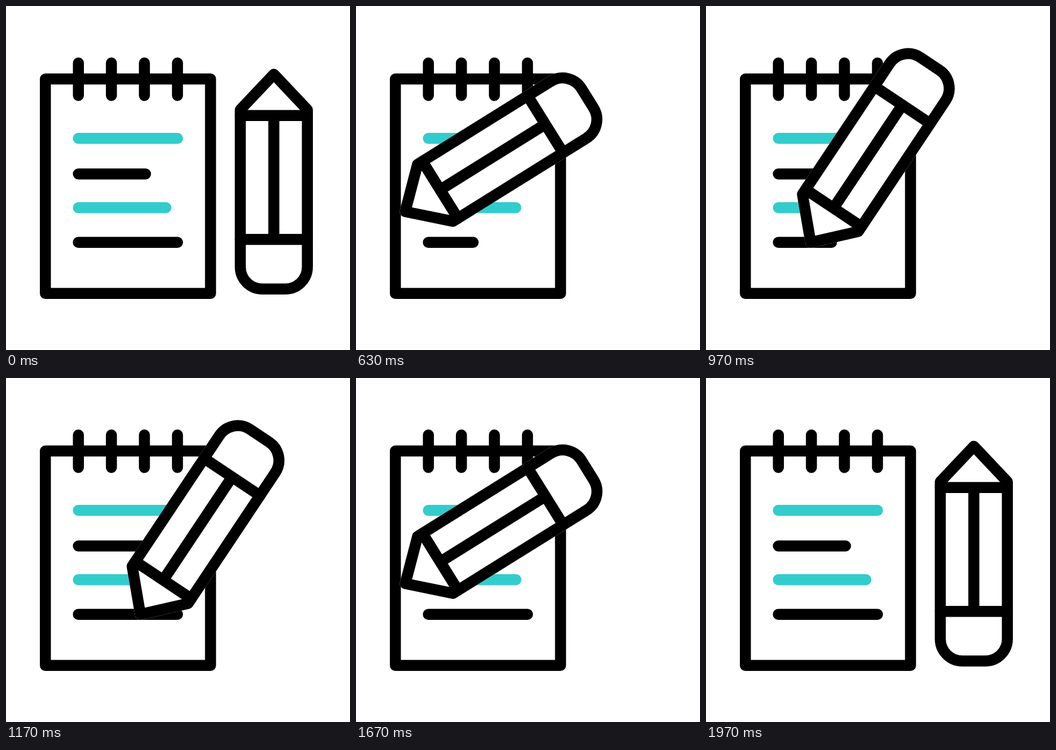
Recreate the animation shown at these times as an HTML page. Size 640x640 px, loop 2500 ms.

```html
<!DOCTYPE html>
<html lang="en">
<head>
<meta charset="utf-8">
<title>Notepad and pencil</title>
<style>
  html, body { margin: 0; width: 100%; height: 100%; overflow: hidden; background: #fff; }
  svg { display: block; width: 100vw; height: 100vh; }
</style>
</head>
<body>
<svg viewBox="0 0 640 640" fill="none" stroke="#000" stroke-width="20.5" stroke-linecap="round" stroke-linejoin="round">
  <defs>
    <path id="body" d="M-62.4-134 0-200 62.4-134V158.5a41 41 0 0 1-41 41H-21.4a41 41 0 0 1-41-41Z"/>
  </defs>
  <path d="M73.25 135.75H380.5V534.75H73.25Z"/>
  <path d="M134.7 106V166.5M196.1 106V166.5M257.5 106V166.5M319 106V166.5M134.6 312.6H259.6"/>
  <path stroke="#3cc" d="M134.6 246.2H319M134.6 375.2H297.5"/>
  <path id="line"/>
  <g id="pencil">
    <use href="#body" fill="#fff" stroke="#fff"/>
    <use href="#body"/>
    <path d="M-62.4-123.3H62.4M-62.4 107.3H62.4M0-123.3V107.3"/>
  </g>
</svg>
<script>
const FPS = 30, LOOP = 2500;
const line = document.getElementById('line');
const pencil = document.getElementById('pencil');

const mix = (a, b, p) => a + (b - a) * p;
const span = (f, from, to) => Math.min(1, Math.max(0, (f - from) / (to - from)));

function bezier(x1, y1, x2, y2) {
  const at = (u, a, b) => 3 * (1 - u) ** 2 * u * a + 3 * (1 - u) * u * u * b + u ** 3;
  return s => {
    let lo = 0, hi = 1;
    for (let i = 0; i < 24; i++) {
      const mid = (lo + hi) / 2;
      if (at(mid, x1, x2) < s) lo = mid; else hi = mid;
    }
    return at(lo, y1, y2);
  };
}
const arrive = bezier(.2, 0, .65, 1);
const leave = bezier(.33, 0, .75, .9);
const smooth = bezier(1 / 3, 0, 2 / 3, 1);

function draw(f) {
  // the pencil flies in, strokes right and left, then flies back
  const goIn = span(f, 9, 21), goOut = span(f, 48.2, 59);
  const near = goOut > 0 ? 1 - leave(goOut) : arrive(goIn);
  const stroke = smooth(span(f, 21, 37)) - smooth(span(f, 37, 48.2));
  const x = mix(498.3, 245.2, near) + 121 * stroke;
  const y = mix(327, 273.4, near);
  const turn = -146.3 * (goIn - goOut);
  pencil.setAttribute('transform', `translate(${x} ${y}) rotate(${turn})`);

  // the bottom line is erased, then written again
  const length = 1 - span(f, 12.94, 24) + span(f, 25, 32.45);
  line.setAttribute('d', length > 0 ? `M134.6 439.7h${184.4 * length}` : '');
}

const start = performance.now();
function tick() {
  const t = (performance.now() - start) % LOOP;
  draw(Math.floor((t + 4) * FPS / 1000));
  requestAnimationFrame(tick);
}
tick();
</script>
</body>
</html>
```
